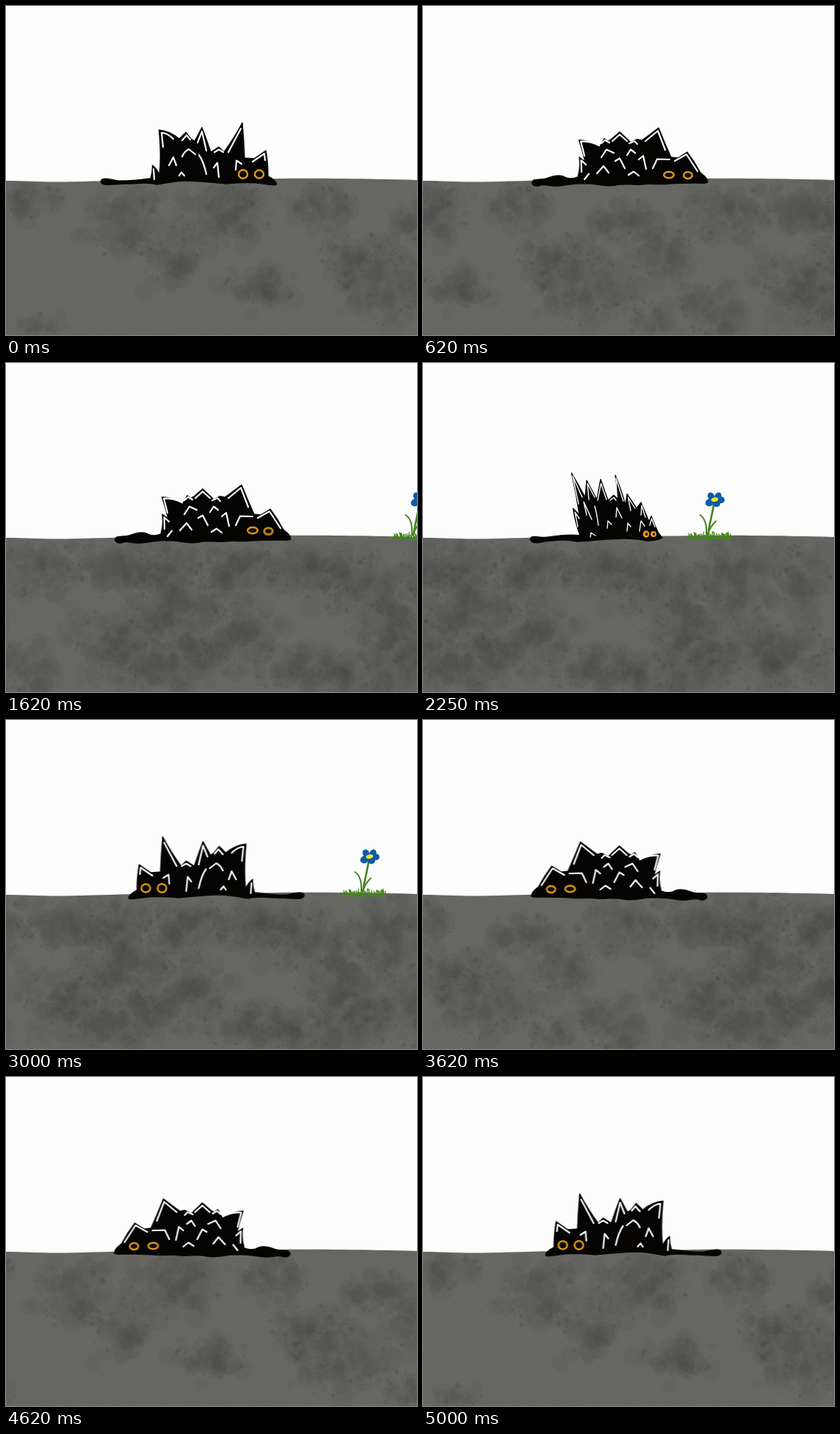
An HTML page with a canvas for the animation above (5.87 s loop, 560 px wide and 448 px high).

```html
<!DOCTYPE html>
<html lang="en">
<head>
<meta charset="utf-8">
<title>Spiky cat and a flower</title>
<style>
html, body { margin: 0; width: 100%; height: 100%; overflow: hidden; background: #fdfdfd; }
#stage { position: relative; width: 560px; height: 448px; overflow: hidden; background: #fdfdfd; }
#ground {
  position: absolute; inset: 0; background: #666762;
  clip-path: path("M0 238C25 238 50 240 80 239.5S150 237.5 200 236.5S300 236 360 235.2S480 235 560 237V448H0Z");
}
canvas { position: absolute; left: 0; top: 230px; }
svg { position: absolute; left: 0; top: 0; }
.scroll, .flip, #low, #tall, #long, #eyes ellipse { animation: 5.87s step-end infinite; }
.scroll { animation-name: scroll; }
.flip { animation-name: flip; }
#low { animation-name: low; }
#tall { animation-name: tall; }
#long { animation-name: long; }
#eyes .near { animation-name: near; }
#eyes .far { animation-name: far; }
.body { fill: #050403; stroke: #050403; stroke-width: 1.4; stroke-linejoin: round; }
.shine { fill: none; stroke: #fdfdfd; stroke-width: 2.2; stroke-linecap: round; stroke-linejoin: round; }
.thin { stroke-width: 1.4; }
.eye { fill: #0a0702; stroke: #dc9715; stroke-width: 2.5; }
.lit { fill: #eb9d12; }
.green { fill: none; stroke: #43841d; stroke-linecap: round; }

@keyframes scroll {
  0% { transform: translateX(0); }
  4.25% { transform: translateX(-100px); }
  10.56% { transform: translateX(-300px); }
  17.03% { transform: translateX(-368px); }
  21.29% { transform: translateX(-468px); }
  27.59% { transform: translateX(-668px); }
  34.07% { transform: translateX(-737px); }
  38.33% { transform: translateX(-835px); }
  51.1% { transform: translateX(-737px); }
  55.36% { transform: translateX(-637px); }
  61.66% { transform: translateX(-437px); }
  68.14% { transform: translateX(-368px); }
  72.4% { transform: translateX(-268px); }
  78.7% { transform: translateX(-68px); }
  85.17%, 100% { transform: translateX(0); }
}
@keyframes flip {
  0% { transform: none; }
  51.1%, 100% { transform: matrix(-1, 0, 0, 1, 535.5, 0); }
}
@keyframes low {
  0%, 17.03%, 34.07%, 51.1%, 68.14%, 85.17%, 100% { visibility: visible; }
  4.25%, 21.29%, 38.33%, 55.36%, 72.4% { visibility: hidden; }
}
@keyframes tall {
  0%, 10.56%, 27.59%, 51.1%, 61.66%, 78.7%, 100% { visibility: hidden; transform: none; }
  4.25%, 21.29%, 55.36%, 72.4% { visibility: visible; transform: matrix(1, 0, 0, 1.055, 0, -13.2); }
  38.33% { visibility: visible; transform: none; }
}
@keyframes long {
  0%, 17.03%, 34.07%, 68.14%, 85.17%, 100% { visibility: hidden; }
  10.56%, 27.59%, 61.66%, 78.7% { visibility: visible; }
}
@keyframes near {
  0%, 51.1%, 100% { transform: none; }
  17.03% { transform: translate(1px, -2px); }
}
@keyframes far {
  0%, 51.1%, 100% { transform: none; }
  17.03% { transform: translate(-3.5px, -1.5px); }
}
</style>
</head>
<body>
<div id="stage">
  <div id="ground"><canvas class="scroll" width="1400" height="218"></canvas></div>
  <svg width="560" height="448" viewBox="0 0 560 448">
    <g class="scroll">
      <g transform="translate(835 0)">
        <path id="grass" class="green" stroke-width="1.3"/>
        <path class="green" stroke-width="2.6" d="M396 193C394 207 390 220 388 235"/>
        <path class="green" stroke-width="2" d="M377.5 207C385 212 387 221 386 234M399 215.500C394 220 390 226 388 234"/>
        <g fill="#0d5ca6">
          <ellipse cx="392.500" cy="181.500" rx="4.500" ry="5.500" transform="rotate(-30 392.500 181.500)"/>
          <ellipse cx="402" cy="181.500" rx="4.500" ry="5.500" transform="rotate(25 402 181.500)"/>
          <ellipse cx="405.500" cy="186.500" rx="5.500" ry="4.500"/>
          <ellipse cx="400" cy="191.500" rx="5" ry="4.500"/>
          <ellipse cx="390.500" cy="190" rx="6" ry="5" transform="rotate(-20 390.500 190)"/>
        </g>
        <ellipse cx="397.500" cy="186" rx="4.800" ry="2.800" fill="#f4e71d" transform="rotate(-8 397.500 186)"/>
      </g>
    </g>

    <g class="flip">
      <g id="low">
        <path class="body" d="M131 236C136 233 143 237 152 238C170 239 183 236 197 235Q200 226 199.500 217Q206 222 209 230Q212 205 208.500 169C219 170 229 175 236 181L245 172L252 181L257 184L267 165.500Q273 181 279 199L290 192L297 199C307 185 314 174 322 159Q324 182 325 207L338 208L354 197Q357 213 357 232C363 235 368 238 368.500 243C364 245 358 243 350 242C337 240 323 240 300 242C280 240 261 238 245 238C229 238 219 241 205 243C192 239 179 242 165 242C152 242 143 244 135 243C129 242 128 238 131 236Z"/>
        <path class="shine" d="M228 181Q220 173 212 172.500L214 192M240 183L246 176L251 182M261 186L267 171L273 197M284 199L290 195.500L296 199M303 199L320 167M222 217L228 206L232 217M240 205Q243 198 249 195L258 202M263 203Q269 211 273 229M283 220L288 213.500L290 233M236 231L239 226.500L243 231M201 222L202 236M313 223L314 210.500L321 215M336 212L352 201L353 210"/>
        <ellipse class="eye" cx="323" cy="229" rx="6" ry="5.800"/>
        <ellipse class="eye" cx="345" cy="229" rx="6" ry="5.500"/>
      </g>

      <g id="tall" visibility="hidden">
        <path class="body" d="M148 237C153 235 159 238 166 237.500C182 236 195 232 214 235Q207 216 204.500 198L213 207Q209 178 202.500 150Q212 166 221 183L223 160L237 186L242 158.500L252 187L260 180L266 186L262 153Q270 172 276 194L278 178.500L291 198L297 190L308 216L311 208.500Q317 224 321 232L326 238C320 241 312 242 305 242C296 240 281 238 260 239.500C241 240 226 243 210 243C193 239 179 242 165 243C158 245 151 246 148 243C146 241 145 239 148 237Z"/>
        <path class="shine thin" d="M212 192L204 154L217 183M226 186L224 164L234 183M238 187L242.500 164L250 186M264 181L263 157L273 188M283 201L279.500 183L289 198M297 207L298 194L303 210M211 223L207 203L213 212M223 207L219 189L230 213M234 195Q237 206 239 221M263 210L264 197L271 211M251 225L252 215L257 220M278 229L279 218L283 223M228 237L229 231L235 235M295 229L297 215L302 222M309 221L311.500 212L316 223M255 187L260 183L263 187"/>
        <ellipse class="lit" cx="304" cy="233" rx="4.200" ry="4.800"/>
        <ellipse class="lit" cx="314" cy="233" rx="4" ry="4"/>
        <ellipse cx="304.500" cy="233" rx="1.500" ry="2.200"/>
        <ellipse cx="314.500" cy="233" rx="1.700" ry="1.500"/>
      </g>

      <g id="long" visibility="hidden">
        <path class="body" d="M151 237C158 235 165 237 171 234C181 230 189 230 195 234C201 236 206 235 211 233Q215 220 213 206L221 212Q217 196 212.500 182.500Q228 184 241 191L247 180.500L252 184L257 181L268 171.500L278 181L283 186L292 181.500L298 183L305 178L321 166Q329 186 338 206L347 207L360 199Q370 212 378 227C383 231 388 235 388 240C386 242 379 241 371 241C355 241 345 241 335 242C320 244 311 241 298 243C283 244 274 241 262 244C245 247 236 241 221 242C205 241 196 244 184 245C173 246 166 241 157 245C150 246 146 241 151 237Z"/>
        <path class="shine" d="M240 190Q228 184 215 184.500L220 204M216 226L215.500 210L222 216M243 187L248 182.500L254 186M258 184L268 175L278 184M281 187L286 185M288 184L292 188M303 184L320 170L330 196M243 206L250 195.500L260 200M278 203L283 195.500L289 200M237 228L246 218L253 227M262 211L268 207.500L275 221M294 209L300 204L304 222M220 236L226 228.500M280 230L287 225.500L294 231M313 221L319 208.500L336 209M343 211L359 202L374 225"/>
        <g id="eyes">
          <ellipse class="eye near" cx="335" cy="230" rx="6.800" ry="4.300"/>
          <ellipse class="eye far" cx="361" cy="230.500" rx="5.800" ry="4.600"/>
        </g>
      </g>
    </g>
  </svg>
</div>
<script>
let seed = 17;
const rand = () => (seed = (seed * 16807) % 2147483647) / 2147483647;
const spread = () => rand() + rand() + rand() - 1.5;
const ctx = document.querySelector('canvas').getContext('2d');

function dab(x, y, r, alpha) {
  ctx.fillStyle = `rgba(66,66,69,${alpha})`;
  ctx.beginPath();
  ctx.ellipse(x, y, r, r * (0.6 + rand() * 0.4), rand() * 3, 0, Math.PI * 2);
  ctx.fill();
}

// centre x, centre y, half width, half height of each stain
const stains = [
  [35, 265, 40, 22], [160, 295, 48, 42], [225, 350, 38, 30], [295, 285, 60, 42],
  [345, 383, 48, 28], [428, 272, 45, 26], [515, 385, 60, 42], [50, 435, 28, 14],
  [480, 340, 45, 30], [575, 290, 45, 24], [628, 335, 44, 34], [695, 415, 40, 38],
  [613, 428, 28, 24], [710, 282, 56, 34], [818, 380, 56, 44], [815, 282, 55, 32],
  [888, 275, 55, 38], [905, 335, 65, 42], [890, 410, 70, 38], [985, 375, 58, 38],
  [985, 280, 60, 34], [1085, 278, 60, 34], [1066, 418, 56, 30], [1140, 300, 50, 40],
  [1130, 425, 50, 26], [1200, 355, 60, 48], [1262, 290, 60, 44], [1310, 395, 72, 46],
  [1355, 290, 40, 40], [1205, 415, 50, 34]
];

ctx.translate(0, -230);
for (const [x, y, w, h] of stains) {
  const n = w * h / 28;
  for (let i = 0; i < n; i++) dab(x + spread() * w, y + spread() * h, 6 + rand() * 12, 0.075);
  for (let i = 0; i < n / 2; i++) {
    const a = rand() * Math.PI * 2, d = 0.75 + rand() * 0.45;
    dab(x + Math.cos(a) * w * d, y + Math.sin(a) * h * d, 0.6 + rand() * rand() * 4, 0.22);
  }
}
for (let i = 0; i < 9000; i++) dab(rand() * 1400, 230 + rand() * 218, 0.5 + rand(), 0.06);

let blades = '';
for (let x = 360; x < 421; x += 1.3) {
  const base = 236 + rand() * 4;
  blades += `M${x} ${base}l${rand() * 4 - 2} ${-2 - rand() * 5}`;
}
for (let x = 363; x < 417; x += 2) blades += `M${x} ${238 + rand() * 2}h${2 + rand() * 3}`;
document.getElementById('grass').setAttribute('d', blades);
</script>
</body>
</html>
```
